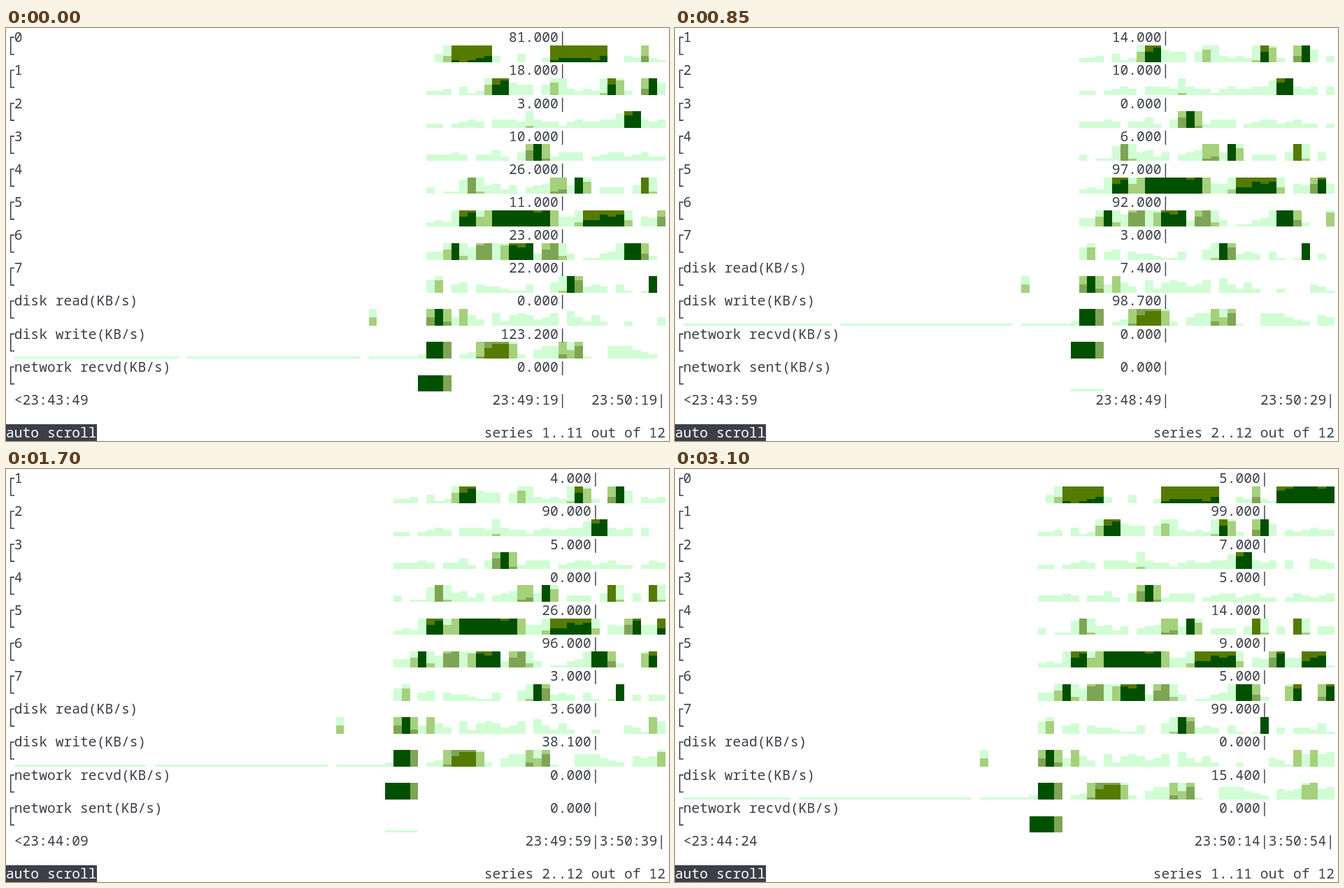
An HTML page with a canvas that plays this animation: 948x591 px, repeating every 3350 ms.

```html
<!DOCTYPE html>
<html>
<head>
<meta charset="utf-8">
<style>
html, body { margin: 0; width: 948px; height: 591px; overflow: hidden; background: #fff; }
canvas { display: block; }
</style>
</head>
<body>
<canvas id="stage" width="948" height="591"></canvas>
<script>
const ctx = document.getElementById('stage').getContext('2d');
const LOOP = 3350, COLS = 80, CELL_W = 11.7875, CELL_H = 23.58, TOP = 1.4;
const FIRST_SAMPLE = 50, SAMPLES = 87;
const INK = '#3c3f49';
const BANDS = ['#d0fdd4', '#a5d07c', '#7fa554', '#557a00', '#005000'];

// Bursts of activity are [first sample, length, height]
const cpu = (name, bursts, scale = 95) => ({ name, scale, base: .12, digits: 0, bursts });
const disk = (name, scale, bursts) => ({ name: `disk ${name}(KB/s)`, scale, base: .18, digits: 1, bursts });
const network = (name, ...burst) => ({ name: `network ${name}(KB/s)`, scale: 95, base: 0, digits: 0, bursts: [burst] });

const SERIES = [
  cpu('0', [[54, 5, 82], [66, 7, 83], [77, 1, 46], [80, 7, 97]]),
  cpu('1', [[59, 2, 93], [66, 1, 34], [73, 1, 88], [78, 1, 99]]),
  cpu('2', [[63, 1, 21], [75, 2, 99]]),
  cpu('3', [[64, 1, 95]]),
  cpu('4', [[56, 1, 35], [66, 2, 26], [69, 1, 59], [77, 1, 47], [82, 1, 47]], 59),
  cpu('5', [[55, 2, 92], [59, 7, 99], [70, 5, 90], [80, 1, 92], [83, 3, 90]]),
  cpu('6', [[54, 1, 96], [57, 2, 56], [61, 3, 99], [65, 2, 56], [75, 2, 98], [82, 1, 90], [86, 1, 92]]),
  cpu('7', [[52, 1, 33], [68, 1, 99], [78, 1, 99]]),
  disk('read', 65, [[44, 1, 20], [52, 1, 65], [55, 1, 26], [82, 1, 26], [84, 1, 26]]),
  disk('write', 270, [[51, 2, 300], [58, 3, 210], [67, 1, 123.2], [69, 1, 150], [83, 2, 105]]),
  network('recvd', 50, 3, 110),
  network('sent', 50, 4, 3)
];

function noise(s, i) {
  const n = Math.sin(s * 78.233 + i * 12.9898) * 43758.5453;
  return n - Math.floor(n);
}

// Low noise, then bursts with uneven tops and lower shoulders on both sides
function sample({ scale, base, digits, bursts }, s, i) {
  const n = noise(s, i);
  let value = i > FIRST_SAMPLE && n > .25 ? n * base * scale : 0;
  if (s === 9 && i < FIRST_SAMPLE) value = i % 22 === 21 ? 0 : 8;
  for (const [start, length, height] of bursts) {
    const last = start + length - 1;
    const shoulder = (i === start - 1 || i === last + 1) && i >= FIRST_SAMPLE;
    if (i === last) value = height;
    else if (i >= start && i < last) value = height * (1 - .1 * n);
    else if (shoulder) value = Math.max(value, height * .55 * n);
  }
  return Number(value.toFixed(digits));
}

const data = SERIES.map((series, s) => Array.from({ length: SAMPLES }, (_, i) => sample(series, s, i)));

// Held cursor keys: start time, number of 50 ms repeats, columns per repeat
const HOLDS = [[300, 7, -1], [850, 1, -1], [1050, 5, -2], [1500, 5, 4.4]];
const TICKS = [200, 850, 1200, 1650, 1950, 2550, 3100];

function cursorAt(t) {
  let col = 67;
  for (const [start, count, step] of HOLDS) {
    const repeats = Math.floor((t - start) / 50) + 1;
    col += step * Math.max(0, Math.min(count, repeats));
  }
  return Math.round(col);
}

const lineY = line => TOP + line * CELL_H;

function text(str, col, line, color = INK) {
  ctx.fillStyle = color;
  ctx.fillText(str, col * CELL_W, lineY(line) + 18.8);
}

const textEnding = (str, col, line) => text(str, col + 1 - str.length, line);

function clock(i) {
  const sec = 23 * 3600 + 43 * 60 + 44 + i * 5;
  return [sec / 3600, sec / 60 % 60, sec % 60].map(n => String(Math.floor(n)).padStart(2, '0')).join(':');
}

function cell(value, scale, col, line) {
  const level = Math.min(40, Math.round(value / scale * 40));
  if (!level) return;
  const band = Math.floor((level - 1) / 8);
  const x = Math.round(col * CELL_W), w = Math.round((col + 1) * CELL_W) - x;
  const y = Math.round(lineY(line)), h = Math.round(lineY(line + 1)) - y;
  if (band) {
    ctx.fillStyle = BANDS[band - 1];
    ctx.fillRect(x, y, w, h);
  }
  const filled = Math.round(h * (level - band * 8) / 8);
  ctx.fillStyle = BANDS[band];
  ctx.fillRect(x, y + h - filled, w, filled);
}

function bracket(line) {
  const top = lineY(line) + 12, bottom = top + CELL_H + .8;
  ctx.beginPath();
  ctx.moveTo(12, top);
  ctx.lineTo(6.7, top);
  ctx.lineTo(6.7, bottom);
  ctx.lineTo(12, bottom);
  ctx.stroke();
}

function draw(t) {
  const shift = TICKS.filter(tick => tick <= t).length;
  const cursor = cursorAt(t);
  const first = t >= 850 && t < 1800 ? 1 : 0;

  ctx.fillStyle = '#fff';
  ctx.fillRect(0, 0, 948, 591);
  ctx.font = '19.65px "Noto Sans Mono", monospace';
  ctx.strokeStyle = INK;
  ctx.lineWidth = 1.6;

  for (let row = 0; row < 11; row++) {
    const s = first + row, { name, scale } = SERIES[s], line = row * 2;
    for (let col = 1; col < COLS; col++) cell(data[s][col + shift], scale, col, line + 1);
    bracket(line);
    text(name, 1, line);
    textEnding(data[s][cursor + shift].toFixed(3) + '|', cursor, line);
  }

  text('<' + clock(1 + shift), 1, 22);
  textEnding(clock(79 + shift) + '|', 79, 22);
  ctx.fillStyle = '#fff';
  ctx.fillRect((cursor - 8) * CELL_W, lineY(22), 9 * CELL_W, CELL_H);
  textEnding(clock(cursor + shift) + '|', cursor, 22);

  ctx.fillStyle = INK;
  ctx.fillRect(0, 567, 130, 24);
  text('auto scroll', 0, 24, '#fff');
  textEnding(`series ${first + 1}..${first + 11} out of 12`, 79, 24);
}

const start = performance.now();
function frame() {
  draw((performance.now() - start) % LOOP);
  requestAnimationFrame(frame);
}
frame();
</script>
</body>
</html>
```
